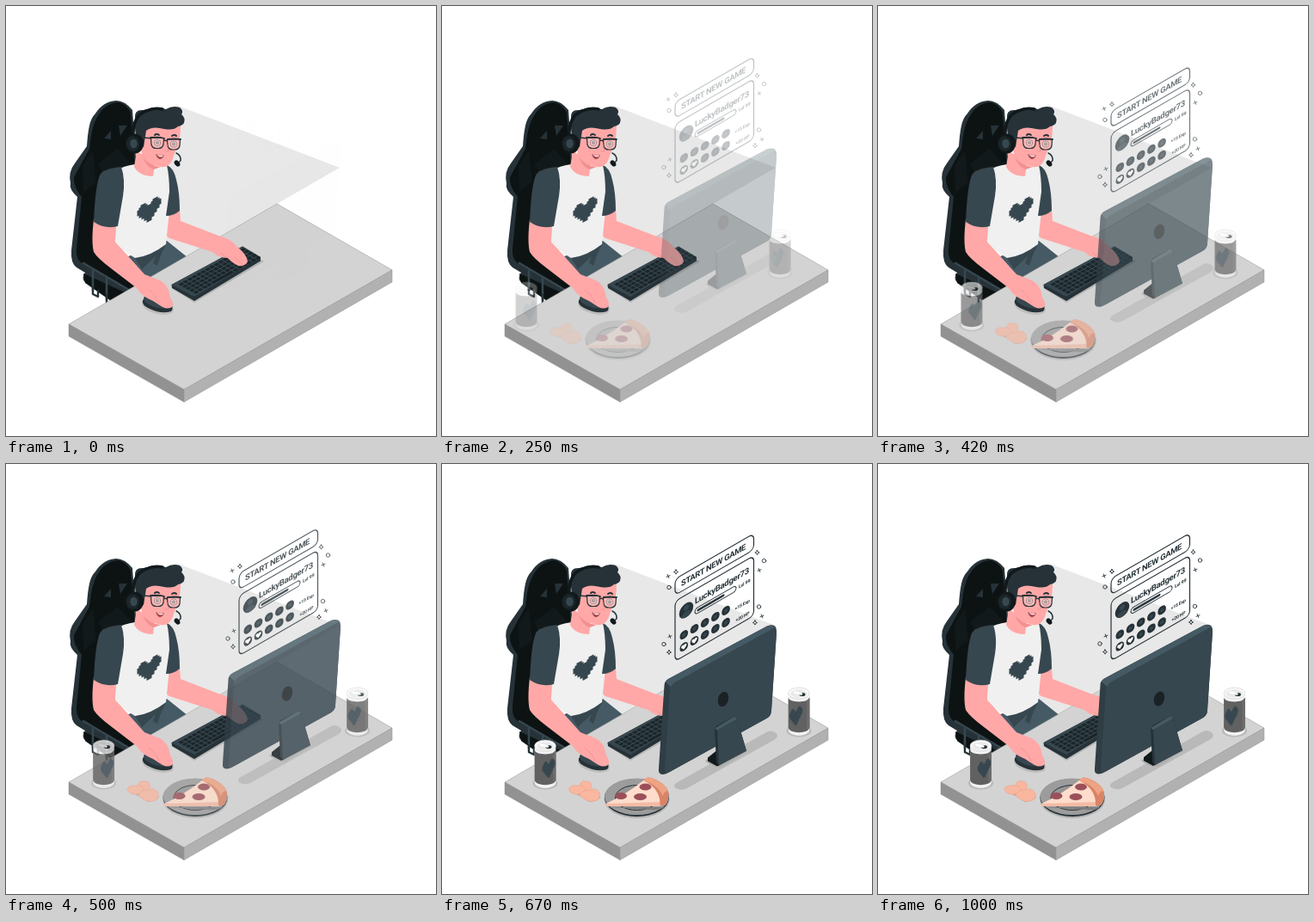
An HTML page that plays this animation: 500x500 px, repeating every 1.04 s.

```html
<!DOCTYPE html>
<html lang="en">
<head>
<meta charset="utf-8">
<title>Gamer at a desk</title>
<style>
html, body { margin: 0; width: 100%; height: 100%; overflow: hidden; background: #fff }
svg { display: block; width: 100%; height: 100% }
text { font-family: Roboto, Inter, sans-serif; font-weight: 600; letter-spacing: -.035em; fill: #263238 }
.ink { fill: #263238 }
.black { fill: #0d1313 }
.slate { fill: #37474f }
.skin { fill: #ffa8a7 }
.line { fill: none; stroke: #263238; stroke-linecap: round; stroke-linejoin: round }
.fold { fill: none; stroke: #ed8f8f; stroke-width: .7; stroke-linecap: round }
</style>
</head>
<body>
<svg viewBox="0 0 500 500">
<defs>
  <path id="heart" d="M4 0h6v2h2v2h4v-2h2v-2h6v2h2v2h2v6h-2v3h-3v3h-3v3h-3v3h-6v-3h-3v-3h-3v-3h-3v-3h-2v-6h2v-2h2z"/>
  <path id="plus" class="line" stroke-width=".9" d="M0-2.6Q.3-.3 2.6 0Q.3.3 0 2.6Q-.3.3-2.6 0Q-.3-.3 0-2.6z"/>
  <path id="spark" class="line" stroke-width=".9" d="M-2 .8L2-.8M-.8-2L.8 2"/>
  <circle id="ring" class="line" stroke-width=".9" r="2.2"/>
  <g id="eye">
    <path d="M-7.5-5.500H7.500L7 2Q6 6.500 1 6.500H-1Q-6 6.500-7 2z" fill="#ffb9b7" stroke="#263238" stroke-width="1.200"/>
    <circle r="3.700" fill="#f3e4e4" stroke="#8a6466" stroke-width=".7"/>
    <circle r="1.900" fill="none" stroke="#8a6466" stroke-width=".7"/><circle r=".7" class="ink"/>
  </g>
  <g id="can">
    <ellipse cy="43.5" rx="14.5" ry="7.5" fill="#b9b9b9"/>
    <path d="M-12.3 0V42.5C-12 51.5 12 51.5 12.3 42.5V0z" fill="#f2f2f2"/>
    <path d="M-12.4 5V40C-11 47.500 11 47.500 12.4 40V5C11 11.500-11 11.500-12.4 5z" fill="#616161"/>
    <path d="M9 8.500L12.4 5V40L9 43z" fill="#6c6c6c"/>
    <ellipse rx="12.3" ry="6.500" fill="#fafafa" stroke="#d2d2d2" stroke-width=".7"/>
    <ellipse cy=".4" rx="9.8" ry="4.600" fill="#e9e9e9"/>
    <ellipse cx="4" cy="1.500" rx="3.500" ry="2" class="ink"/>
    <path d="M-5-1L3 1" stroke="#fff" stroke-width="2.400" stroke-linecap="round"/>
  </g>
</defs>

<path d="M200 116L388 188L150 325L180 150z" fill="#e8e8e8"/>

<g id="chair">
  <path class="ink" d="M128 110Q138 110 147 121L152 190L112 194L106 260L160 330L123 345L92 321Q87 317 92 310L82 304Q75 299 76 284L83 222Q73 213 75 206Q72 193 80 183L94 163Q95 148 97 139Q99 130 104 125Q113 111 128 110z"/>
  <path class="black" d="M131 112Q140 114 145 124L150 186L112 191L104 252L118 290L160 322L150 334L88 299Q81 294 82 282L88 222Q78 210 79 199L97 166Q99 141 106 129Q116 112 131 112z"/>
  <path fill="#12191b" d="M89 186L101 168L105 205L90 216zM107 184L130 166L148 186L112 192z"/>
  <path class="ink" d="M114 154L122 145V155zM131 139H141L133 151z"/>
  <path fill="#fff" d="M91 322L122 337V347H88z"/>
  <path class="black" d="M90 311L160 343L125 345L92 322z"/>
  <path class="line" style="stroke:#37474f" stroke-width="2.500" d="M90 299L148 333M101 308V331M117 317V342"/>
  <path class="line" stroke-width="2.400" d="M101 327V335L107 338V331M117 336V345"/>
</g>

<path fill="#455a64" d="M140 292L187 273L212 293L150 330z"/>
<path class="slate" d="M150 293L186 277L180 290L176 302L171 299L174 291L158 306z"/>

<g stroke="#909090" stroke-width=".5" stroke-linejoin="round">
  <path fill="#d3d3d3" d="M73 370L315 230L449 307L207 446z"/>
  <path fill="#929292" d="M73 370L207 446V460.500L73 384z"/>
  <path fill="#b1b1b1" d="M207 446L449 307V321L207 460.500z"/>
</g>

<path fill="#b5b5b5" d="M193 328L276 284L300 297L219 345z"/>
<path class="ink" d="M192.500 324L275 279.500L296 292V296.500L219 343L193 328z"/>
<path class="slate" d="M192.500 324L275 279.500L296 292L219 338z"/>
<g id="keys" fill="#1b2529" transform="matrix(.8 -.448 .258 .141 194.500 324)"></g>

<path fill="#bcbcbc" d="M158 343Q157 350 165 354Q181 362 193 357Q198 352 190 345z"/>
<path class="ink" d="M159 342Q158 348 165 351Q180 359 192 355Q196 350 190 345L168 333z"/>
<path class="slate" d="M160 339Q160 345 168 348Q180 354 193 350L188 340L168 332z"/>

<g id="gamer">
  <path class="skin" d="M185 243L202 237L203 250L247 267Q261 270 269 280Q280 289 281 297Q279 303 270 302Q263 299 258 293Q247 293 240 286L190 270Q184 266 184 258z"/>
  <path class="fold" d="M258 293Q252 290 250 287M276 302Q271 296 266 292"/>
  <path class="skin" d="M102 248Q99 274 102 286Q106 293 122 305L152 328Q158 338 171 343Q177 347 182 350Q188 353 193 350Q196 346 191 339Q189 324 179 319L161 312L127 274L130 250z"/>
  <path class="fold" d="M166 330Q174 336 178 345"/>
  <path fill="#f0f0f0" d="M132 189Q144 184 154 184L174 187Q184 182 191 188L190 238L186 277Q168 291 150 293Q136 285 127 274z"/>
  <path class="slate" d="M134 187Q118 188 110 195Q104 205 102 251Q115 260 130 256L136 221Q139 202 134 187z"/>
  <path class="slate" d="M187 185Q195 188 198 202Q202 217 202 238Q195 244 186 244L190 216Q190 198 187 185z"/>
  <use href="#heart" class="slate" transform="translate(152.500 234) skewY(-28) scale(1 1.080)"/>

  <path class="skin" d="M152 168L149 187Q155 198 171 198L173 184z"/>
  <path fill="#f28f8f" d="M159 176Q167 186 180 187L172 190Q164 188 159 176z"/>
  <path class="skin" d="M154 139Q180 125 203 139Q203 160 196 171Q194 180 190 184Q186 188 180 187Q166 184 158 174z"/>
  <path class="ink" d="M150 130Q149 120 160 121Q175 117 186 120Q194 115 202 118Q207 122 204 126Q209 130 207 136Q205 139 200 140Q195 145 184 143Q170 139 163 145L160 164L153 162Q149 145 150 130z"/>
  <path class="line" stroke-width="1.400" d="M160 153L170 154M183 157Q186 155 188 158"/>
  <path class="line" stroke-width="2" d="M173 150Q175 148 178 150M193 151Q196 149 198 151"/>
  <use href="#eye" x="176" y="159"/><use href="#eye" x="195" y="160.500"/>
  <path class="line" stroke-width="1.800" d="M168 153Q178 152 184 154M188 155Q196 154 203 155"/>
  <path class="fold" d="M187 161L189 169L185 169"/>
  <path fill="#a84b50" d="M174 172Q180 175 184 173Q182 179 178 178Q175 176 174 172z"/>
  <path fill="#fff" d="M175 172.500Q180 175 183 173.500L182 175Q178 176 175 172.500z"/>
  <path class="line" stroke-width="3.500" style="stroke:#11191c" d="M148 151Q147 128 163 122Q172 118 182 120"/>
  <ellipse cx="149.500" cy="160" rx="10.500" ry="11.500" fill="#11191c"/>
  <ellipse cx="147.500" cy="160" rx="7.500" ry="8.800" fill="#1c2629"/>
  <ellipse cx="148.500" cy="160" rx="4.200" ry="5.200" class="slate"/>
  <path class="line" stroke-width="1.500" d="M198 171Q204 174 203 180L199 183"/>
  <ellipse cx="199" cy="183" rx="4" ry="2.800" transform="rotate(50 199 183)" fill="#11191c"/>
</g>

<g id="snacks">
  <use href="#can" x="119.500" y="327.500"/>
  <use href="#can" x="414.500" y="266.500"/>
  <use href="#heart" class="slate" transform="translate(116 348) skewY(-24) scale(.54 .9)"/>
  <use href="#heart" class="slate" transform="translate(403.500 287) skewY(-24) scale(.54 .9)"/>
  <path fill="#c1a79f" d="M148 380Q164 388 171 393Q182 392 184 387L170 380z"/>
  <g fill="#f9b79f" stroke="#e99c84" stroke-width=".5">
    <path d="M160 373Q161 368 166 369Q172 368 173 373Q175 377 168 381Q164 379 160 373z"/>
    <path d="M147 378Q149 373 156 374Q164 373 166 378Q166 383 157 384Q148 384 147 378z"/>
    <path d="M159 385Q163 379 171 379Q179 375 183 383Q184 390 177 392Q169 394 159 385z"/>
  </g>
  <ellipse cx="226" cy="390" rx="38" ry="22" fill="#b4b4b4"/>
  <ellipse cx="226" cy="388" rx="37.500" ry="22" class="ink"/>
  <ellipse cx="226" cy="386.800" rx="37.300" ry="21.300" fill="#9c9c9c"/>
  <ellipse cx="226" cy="388" rx="25" ry="14.500" fill="#949494" stroke="#263238"/>
  <path fill="#7d7d7d" d="M193 399H258Q252 403 242 402z"/>
  <path fill="#f3bba5" d="M190 395V398L254 398L256 390z"/>
  <path fill="#ffdccb" d="M190 395Q214 384 235 367L258 376L253 393z"/>
  <path fill="#d98466" d="M234 368Q237 363 243 365Q260 371 263 382Q263 393 259 397L253 397Q254 378 234 368z"/>
  <path fill="#eea384" d="M234 368Q237 363 243 365Q259 371 262 380Q258 380 256 386Q251 373 234 368z"/>
  <g fill="#9b5059">
    <ellipse cx="207.500" cy="386" rx="7" ry="4"/><ellipse cx="236" cy="375.500" rx="7" ry="4"/><ellipse cx="230" cy="387" rx="7.500" ry="4"/>
  </g>
</g>

<g id="drops">
  <path fill="#b9b9b9" d="M273 370L378 311Q384 308 389 313Q392 317 385 321L284 377Q277 380 271 376Q268 373 273 370z"/>
  <path fill="#adadad" d="M306 345L318 334L356 333L325 352Q316 353 306 345z"/>
  <path fill="#2f3d44" d="M258.500 257Q258.500 252 263 249.500L378 188Q389 184 389 194L383 286Q383 292 378 295L261 359.500Q251 363 252 354z"/>
  <path class="slate" d="M265 261Q265 257 270 254L381 193Q389 189 389 196L383 286Q383 292 378 295L264 358Q258 361 259 353z"/>
  <path fill="#455a64" d="M260 253Q261 250.500 263 249.500L378 188Q385 186 388 190Q385 190 381 193L270 254Q267 256 266 259z"/>
  <ellipse cx="327" cy="273" rx="6" ry="8.800" transform="rotate(17 327 273)" fill="#1b2225"/>
  <path fill="#11191c" d="M309 341L319 333L324 349L320 351L309 345z"/>
  <path class="ink" d="M317 307L319 304L340 293L343 296L354 333L322 350L319 347z"/>
  <path class="slate" d="M320 309L343 296L354 333L322 350z"/>
  <path fill="#455a64" d="M317 307L340 293L343 296L320 309z"/>

  <g transform="matrix(1 -.577 0 1 271 133.300)">
    <rect class="line" stroke-width="1.200" width="91.500" height="18.600" rx="5.500"/>
    <text x="7" y="12.700" font-size="9.400">START NEW GAME</text>
  </g>
  <g id="card" transform="matrix(1 -.577 0 1 271 157)">
    <rect class="line" stroke-width="1.200" y="2" width="91.500" height="69.800" rx="5.500"/>
    <circle class="ink" cx="13" cy="20" r="8.300"/>
    <path class="slate" d="M13 14a3.200 3.200 0 0 1 0 6.400a3.200 3.200 0 0 1 0-6.400M7 26Q8 21 13 21.500Q18 21 19 26Q13 30 7 26"/>
    <text x="23" y="18.700" font-size="9.600">LuckyBadger73</text>
    <rect class="line" x="23" y="24.500" width="48" height="6.600" rx="3.300"/>
    <rect class="ink" x="25.500" y="26.500" width="32" height="2.600" rx="1.300"/>
    <text x="74" y="30" font-size="5.500">Lvl 99</text>
    <text x="69.500" y="53" font-size="5.200">+15 Exp</text>
    <text x="70.500" y="67" font-size="5.200">+20 HP</text>
  </g>
  <use href="#plus" x="272" y="125"/><use href="#spark" x="263" y="130"/><use href="#ring" x="264" y="143"/>
  <use href="#plus" x="366.500" y="102.500"/><use href="#ring" x="374.500" y="112"/><use href="#spark" x="369" y="123"/>
  <use href="#spark" x="265" y="200"/><use href="#ring" x="258" y="209"/><use href="#plus" x="264" y="218.500"/>
  <use href="#ring" x="368.500" y="165.500"/><use href="#spark" x="372" y="176.500"/><use href="#plus" x="364" y="184"/>
</g>
</svg>
<script>
const LOOP = 1040, SLIDE = 1000, LEAD = 30, DIST = 30;
const $ = id => document.getElementById(id);

function add(parent, tag, attrs) {
  const el = document.createElementNS('http://www.w3.org/2000/svg', tag);
  for (const k in attrs) el.setAttribute(k, attrs[k]);
  parent.append(el);
}

// Keyboard: five rows of keys with a space bar in the last one
for (let row = 0; row < 5; row++)
  for (let col = 0; col < 15; col++) {
    const space = row === 4 && col === 4;
    if (row === 4 && col > 4 && col < 9) continue;
    add($('keys'), 'rect', { x: 4 + col * 6.4, y: 10 + row * 16.5, width: space ? 30.5 : 5, height: 12.5, rx: 1 });
  }

// Badges: two rows of five, the first two below carry hearts
for (let i = 0; i < 10; i++) {
  const x = 10.3 + i % 5 * 12.2, y = i < 5 ? 47 : 61;
  add($('card'), 'circle', { class: 'ink', cx: x, cy: y, r: 4.8 });
  if (i === 5 || i === 6)
    add($('card'), 'path', { fill: '#fff', d: `M${x} ${y + 3}l-3-3q-.8-2.600 1.500-2.700q1.200 0 1.500 1.200q.3-1.200 1.500-1.200q2.300.1 1.500 2.700z` });
  else
    add($('card'), 'circle', { class: 'slate', cx: x, cy: y, r: 2 });
}

const curve = (s, a, b) => 3 * (1 - s) ** 2 * s * a + 3 * (1 - s) * s * s * b + s ** 3;

// Cubic Bezier easing with a slight overshoot
function ease(p) {
  let lo = 0, hi = 1;
  for (let i = 0; i < 30; i++) {
    const mid = (lo + hi) / 2;
    if (curve(mid, .36, .5) < p) lo = mid; else hi = mid;
  }
  return curve(lo, -.01, 1.38);
}

function draw(now) {
  const e = ease(Math.min(1, (now % LOOP + LEAD) / SLIDE));
  const shift = (e - 1) * DIST;
  const opacity = Math.max(0, Math.min(1, e));
  $('snacks').setAttribute('transform', `translate(${shift} 0)`);
  $('drops').setAttribute('transform', `translate(0 ${shift})`);
  for (const id of ['snacks', 'drops']) $(id).setAttribute('opacity', opacity);
  requestAnimationFrame(() => draw(performance.now()));
}
draw(0);
</script>
</body>
</html>
```
